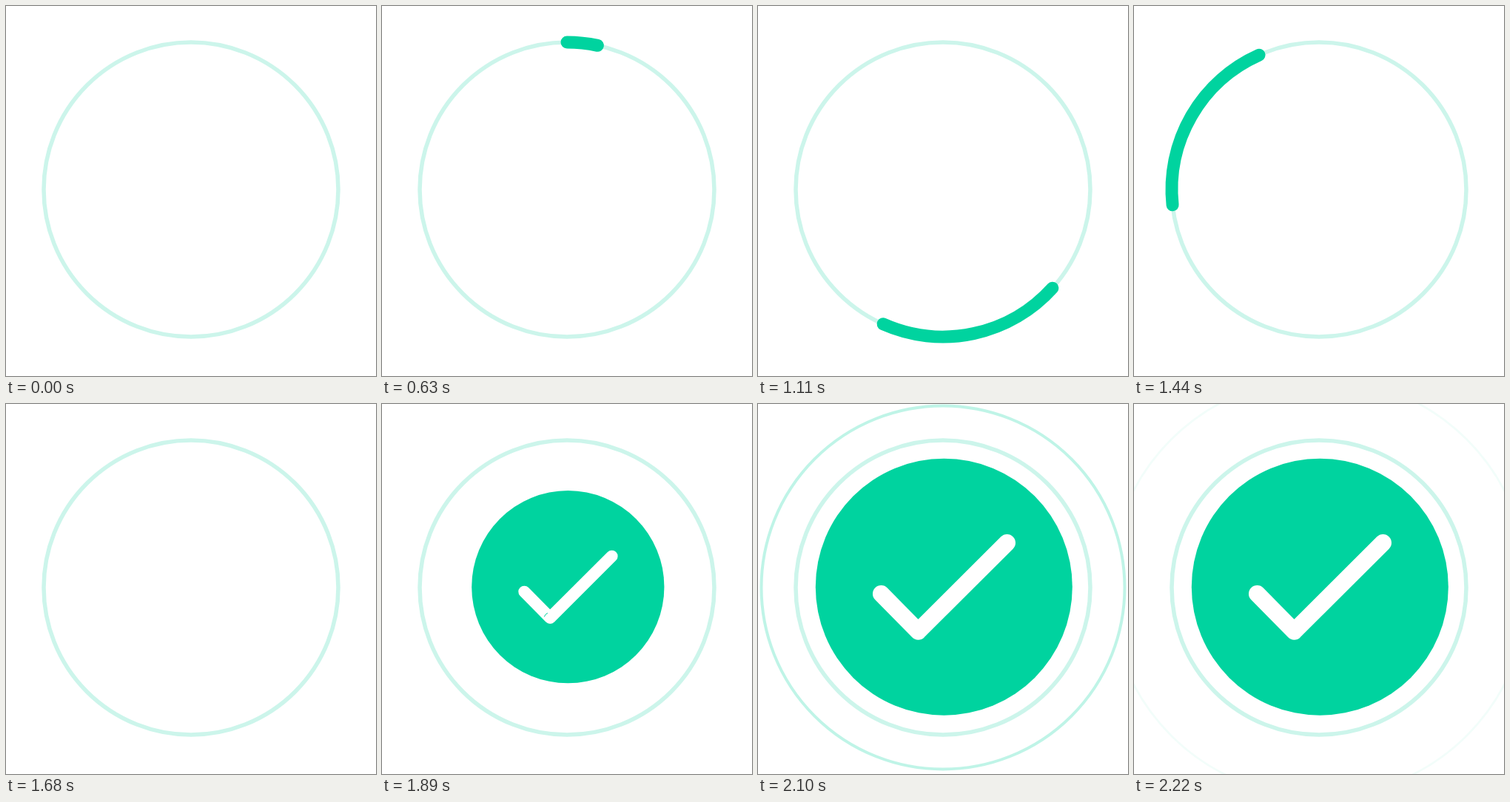
An HTML page with a canvas for the animation above (2730 ms loop, 500 by 500 pixels).

```html
<!DOCTYPE html>
<html lang="en">
<head>
<meta charset="utf-8">
<title>Success check</title>
<style>
  html, body { margin: 0; width: 100%; height: 100%; overflow: hidden; background: #fff; }
  canvas { display: block; }
</style>
</head>
<body>
<canvas id="stage" width="500" height="500"></canvas>
<script>
const ctx = document.getElementById('stage').getContext('2d');
const GREEN = '#00d39f', RING = '#ccf5eb';
const LOOP = 2730, STEP = 30, LAST = 74;
const CX = 250, CY = 248, R = 199;

const clamp = (v, lo, hi) => Math.min(hi, Math.max(lo, v));

function stroke(color, width) {
  ctx.strokeStyle = color;
  ctx.lineWidth = width;
  ctx.stroke();
}

// Angles in degrees, clockwise from the top.
function arc(radius, from, to, color, width) {
  const rad = deg => (deg - 90) * Math.PI / 180;
  ctx.beginPath();
  ctx.arc(CX, CY, radius, rad(from), rad(to));
  stroke(color, width);
}

function drawSpinner(n) {
  const head = clamp(12 * (n - 20), 0, 360);
  const tail = clamp(12 * (n - 26), 0, 360);
  if (head > tail) arc(R, tail, head, GREEN, 17);
}

function drawBadge(n) {
  const discScale = clamp((n - 60) / 4, 0, 1);
  const checkScale = clamp((n - 60) * 0.232, 0, 1);
  if (!discScale) return;

  ctx.save();
  ctx.translate(251.3, 247.2);
  ctx.beginPath();
  ctx.arc(0, 0, 173.5 * discScale, 0, 2 * Math.PI);
  ctx.fillStyle = GREEN;
  ctx.fill();

  ctx.scale(checkScale, checkScale);
  ctx.beginPath();
  ctx.moveTo(-84.8, 9.3);
  ctx.lineTo(-34.8, 60);
  ctx.lineTo(85.2, -59.7);
  stroke('#fff', 23);

  // Thin seam at the corner while the check grows.
  if (checkScale < 1) {
    ctx.beginPath();
    ctx.moveTo(-45.8, 57.5);
    ctx.quadraticCurveTo(-45, 53, -39.8, 51);
    stroke(GREEN, 1.4);
  }
  ctx.restore();
}

function drawRipple(n) {
  if (n < 65) return;
  const p = (n - 65) / 10;
  ctx.globalAlpha = 0.5 * (1 - p);
  arc(R + 93 * p, 0, 360, GREEN, 5.5 - 3 * p);
  ctx.globalAlpha = 1;
}

function draw() {
  const n = Math.min(LAST, Math.floor(performance.now() % LOOP / STEP));
  ctx.fillStyle = '#fff';
  ctx.fillRect(0, 0, 500, 500);
  ctx.lineCap = ctx.lineJoin = 'round';
  arc(R, 0, 360, RING, 5.5);
  drawSpinner(n);
  drawRipple(n);
  drawBadge(n);
  requestAnimationFrame(draw);
}
draw();
</script>
</body>
</html>
```
